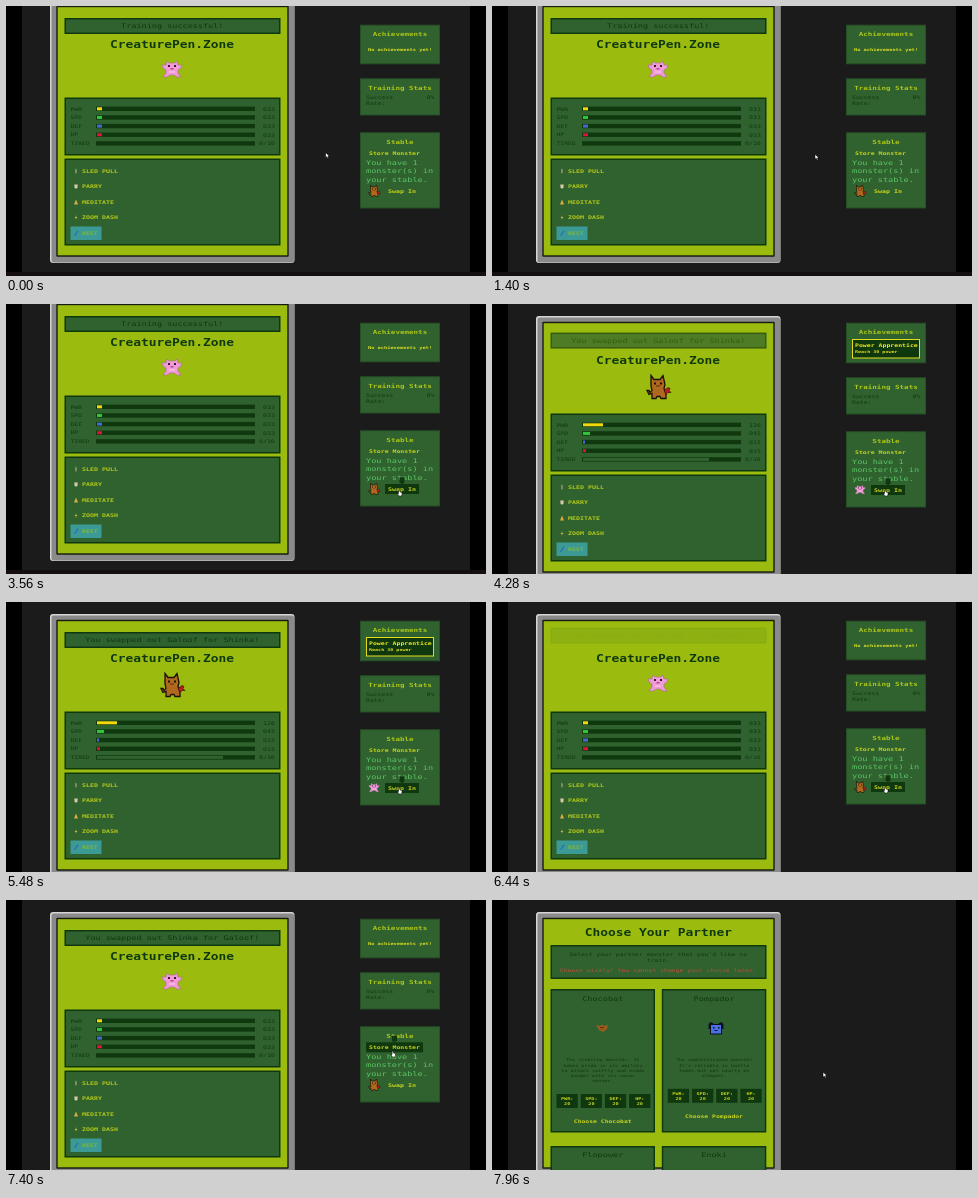
Write an HTML page that moves like this. It is 480 px wide and 270 px high and loops after 8 s.

```html
<!DOCTYPE html>
<html lang="en">
<head>
<meta charset="utf-8">
<title>Monster stable</title>
<style>
  html, body { margin: 0; width: 100%; height: 100%; overflow: hidden; background: #000; }
  svg { display: block; width: 100vw; height: 100vh; }
  text { font-family: "DejaVu Sans Mono", "Liberation Mono", monospace; white-space: pre; }
</style>
</head>
<body>
<svg id="stage" viewBox="0 0 480 270"></svg>
<script>
const LOOP = 8000, SWAP = 3880, SWAP_BACK = 6376, STORE = 7480, FADE = 560;
const INK = '#0f380f', LEAF = '#306230', LIME = '#9bbc0f', GOLD = '#c9d51c', MINT = '#5cc465';
const WIDE = 1.34; // the face is a wide pixel mono

const rect = (x, y, w, h, fill, more = '') =>
  `<rect x="${x}" y="${y}" width="${w}" height="${h}" fill="${fill}" ${more}/>`;
const poly = (points, fill, more = '') => `<polygon points="${points}" fill="${fill}" ${more}/>`;
const group = (id, body, more = '') => `<g id="${id}" ${more}>${body}</g>`;

// x: left edge, y: middle of the capitals, step: advance per character
function label(x, y, str, step, fill, weight = fill === INK ? 400 : 700) {
  const size = step / (0.602 * WIDE);
  return `<text transform="translate(${x} ${(y + size * 0.365).toFixed(2)}) scale(${WIDE} 1)"
    font-size="${size.toFixed(2)}" font-weight="${weight}" fill="${fill}">${str}</text>`;
}
const centered = (cx, y, str, step, fill, weight) =>
  label(cx - str.length * step / 2, y, str, step, fill, weight);

const box = (x, y, w, h, edge = 1.5, stroke = INK) =>
  rect(x + edge / 2, y + edge / 2, w - edge, h - edge, LEAF, `stroke="${stroke}" stroke-width="${edge}"`);
const card = (y, h, title) =>
  box(354, y, 80, h, 1, '#254f25') + centered(394, y + 9.3, title, 4.55, '#abc51a');

const star = poly('-5,-8 -3,-6 3,-6 5,-8 6,-4 10,-4 9,-1 6,1 6,4 9,8 5,8 2,6 -2,6 -5,8 -9,8 -6,4 -6,1 -9,-1 -10,-4 -6,-4',
    '#f09ad8', 'stroke="#a8689a" stroke-width=".6"') +
  rect(-4, -4, 2, 2, '#3c1836') + rect(2, -4, 2, 2, '#3c1836') +
  rect(-1.5, -1, 3, 1.5, '#b04890') + rect(-3, 2, 6, 2, '#f7b4e0');
const cat = poly('-8,-12 -5,-8 1,-8 4,-12 6,-3 5,1 7,6 7,11 2,11 1,9 -2,9 -3,11 -7,11 -7,6 -10,7 -12,3 -10,3 -9,5 -7,3 -8,-2',
    '#b0681f', 'stroke="#1c1008" stroke-width="1.3"') +
  rect(-5, -5, 2, 2, '#1c1008') + rect(1, -5, 2, 2, '#1c1008') + rect(-3, -2, 4, 1, '#5a2c10') +
  poly('5,3 9,0 11,1 10,3 12,5 9,5 7,7', '#b81c1c', 'stroke="#1c1008" stroke-width=".6"');

const frame = group('panel',
  rect(44, 12, 244.5, 263, '#d6d6d6', 'rx="3"') +
  rect(45.5, 13.5, 242.5, 261, '#8a8a8a', 'rx="2"') +
  rect(50.3, 17.8, 232.4, 250.9, '#161a10', 'rx="1"') +
  rect(51.7, 19.2, 229.6, 248.1, LIME) +
  group('game', '') + group('choose', ''));

function gameView() {
  const stats = ['PWR', 'SPD', 'DEF', 'HP', 'TIRED'];
  const tints = ['#f4d80c', '#2fc63a', '#4468dc', '#dc143c', LEAF];
  const moves = [
    ['SLED PULL', '-.8,-2.5 .8,-1 .4,2.5 -.6,2.5', '#a4a070'],
    ['PARRY', '-1.7,-2 1.7,-2 1.5,.8 0,2.4 -1.5,.8', '#d8c8a8'],
    ['MEDITATE', '0,-2.6 2,2.4 -2,2.4', '#dcaa40'],
    ['ZOOM DASH', '.6,-2.4 -1.4,.5 0,.5 -.6,2.4 1.4,-.5 0,-.5', '#d0b840']];
  const rows = stats.map((name, i) => {
    const y = 120.8 + i * 8.65;
    return label(64.5, y, name, 3.85, INK) + rect(90, y - 2.2, 159, 4.4, INK) +
      rect(91, y - 1.5, 5, 3, tints[i], 'class="fill"') +
      `<g class="was">${i < 4 ? label(257, y, '033', 3.95, INK) : label(253, y, '0/10', 3.95, INK)}</g>` +
      `<g class="now">${i < 4 ? label(257, y, ['126', '045', '015', '015'][i], 3.95, INK) : label(253, y, '8/10', 3.95, INK)}</g>`;
  }).join('');
  const list = moves.map(([name, shape, tint], i) => {
    const y = 183 + i * 15.5;
    return poly(shape, tint, `transform="translate(70 ${y})"`) + label(76, y, name, 4, '#b4cb18');
  }).join('');
  return group('note', box(58.5, 30, 216, 16) + label(0, 37.5, '', 5.12, INK)) +
    centered(166, 56, 'CreaturePen.Zone', 7.75, INK, 700) +
    group('starBig', star, 'transform="translate(166 81)"') +
    group('catBig', cat, 'transform="translate(167 83.5)"') +
    box(58.5, 109.5, 216, 58) + rows +
    box(58.5, 170.5, 216, 87) + list +
    rect(64.5, 238.5, 31, 13.5, '#3b9a96') + poly('68,247.5 71.5,242.5 72.5,243.3 69,248', '#2f68b8') +
    label(76, 245, 'REST', 3.9, '#7fb83c');
}

function partner(x, shift, name, lines) {
  const mid = x + 52.3;
  const stats = ['PWR:', 'SPD:', 'DEF:', 'HP:'].map((s, i) =>
    rect(x + 6 + i * 24.2, 194 - shift, 21.3, 14, INK) +
    centered(x + 16.7 + i * 24.2, 198.6 - shift, s, 3.1, GOLD) +
    centered(x + 16.7 + i * 24.2, 204 - shift, '20', 3.1, GOLD)).join('');
  return box(x, 89, 104.5, 143.5) + centered(mid, 99, name, 5.15, INK) +
    lines.map((s, i) => centered(mid, 160 + i * 5.2, s, 3.07, INK)).join('') +
    stats + centered(mid, 221.5 - shift, 'Choose ' + name, 3.87, GOLD);
}

function chooseView() {
  const bat = poly('104,125 108,126 110,124.5 112,126 116,125 115,129 111,132 107,130', '#9a5c1c') +
    rect(108, 127, 4, 1.2, '#5c3210');
  const pom = poly('216.5,124 219,122 222,124 226,124 229,122 231.5,124 231.5,129 230,129 230,134.5 218,134.5 218,129 216.5,129', '#0c1020') +
    rect(219, 125, 10, 8.5, '#4a70e6') + rect(221, 127, 1.5, 1.5, '#0c1020') +
    rect(226, 127, 1.5, 1.5, '#0c1020') + rect(222.5, 130, 3, 1, '#0c1020');
  return centered(166.3, 32, 'Choose Your Partner', 7.75, INK, 700) +
    box(58.5, 45, 216, 34) +
    centered(166.5, 54, "Select your partner monster that you'd like to", 3.87, INK) +
    centered(166.5, 60, 'train.', 3.87, INK) +
    centered(166.5, 70, 'Choose wisely! You cannot change your choice later.', 3.87, '#b8503c', 400) +
    partner(58.5, 0, 'Chocobat', ['The stealthy monster. It', 'takes pride in its ability',
      'to attack swiftly and evade', 'danger with its sonar', 'senses.']) + bat +
    partner(169.8, 5.2, 'Pompador', ['The sophisticated monster', "It's reliable in battle", 'fumes but not nearly as', 'elegant.']) + pom +
    box(58.5, 246, 104.5, 143) + centered(110.8, 255, 'Flopower', 5.15, INK) +
    box(169.8, 246, 104.5, 143) + centered(222, 255, 'Enoki', 5.15, INK);
}

const hover = (id, x, y, w) => group(id, rect(x, y, w, 10, INK) + rect(x + w / 2 - 2.5, y - 6.5, 5, 5.5, INK) +
  rect(x + w / 2 - 1, y - 1, 2, 1, INK));

function sideView() {
  const reward = rect(360.5, 35.5, 67, 18.5, INK, 'stroke="#e2dc20" stroke-width="1"') +
    label(363, 41, 'Power Apprentice', 3.93, '#f4ec20') + label(363, 48, 'Reach 30 power', 3.05, '#e2dc20');
  return group('noAward', card(18.7, 39.6, 'Achievements') + centered(394, 43.5, 'No achievements yet!', 3.2, '#dce01e')) +
    group('award', card(18.7, 40.6, 'Achievements') + reward) +
    group('lower',
      card(72.3, 37.2, 'Training Stats') + label(360, 91, 'Success', 3.9, INK) + label(360, 97.3, 'Rate:', 3.9, INK) +
      label(420.5, 91, '0%', 3.9, INK) +
      card(126.3, 76.2, 'Stable') +
      ['You have 1', 'monster(s) in', 'your stable.'].map((s, i) => label(360, 156.5 + i * 8.5, s, 5.17, MINT, 400)).join('') +
      hover('storeHover', 360, 142.3, 57) + hover('swapHover', 379, 180, 34) +
      label(363, 147.6, 'Store Monster', 3.92, GOLD) + label(382, 185.2, 'Swap In', 4, GOLD) +
      group('catSmall', cat, 'transform="translate(368.5 185) scale(.5)"') +
      group('starSmall', star, 'transform="translate(368 184.5) scale(.52)"'));
}

const stage = document.getElementById('stage');
stage.innerHTML = rect(0, 0, 480, 270, '#000') + rect(16, 0, 448, 270, '#1b1b1b') +
  group('footer', rect(0, 266, 480, 4, '#140d11')) + frame + group('side', sideView()) +
  group('cursor', poly('0,0 0,5.2 1.3,4.2 2.3,6 3.2,5.5 2.4,3.8 3.9,3.6', '#fff', 'id="arrow" stroke="#000" stroke-width=".6"') +
    poly('-.8,0 .2,0 .5,2 2.6,2.6 2.4,5 1.8,6 -.6,6 -2.2,3.4 -1,3.6', '#fff', 'id="hand" stroke="#000" stroke-width=".5"'));

const $ = id => document.getElementById(id);
$('game').innerHTML = gameView();
$('choose').innerHTML = chooseView();
const fills = [...stage.querySelectorAll('.fill')];
const was = [...stage.querySelectorAll('.was')], now = [...stage.querySelectorAll('.now')];
const noteText = $('note').querySelector('text');

const show = (el, on) => el.setAttribute('display', on ? 'inline' : 'none');
const clamp = v => Math.max(0, Math.min(1, v));
const ease = v => v * v * (3 - 2 * v);

// time, x, y of the pointer tip
const track = [[0, 319.5, 146.5], [520, 319.5, 146.5], [600, 320.5, 147], [1280, 320.5, 147], [2360, 391, 179.3],
  [2920, 393, 185], [3560, 393.5, 186], [5720, 393.5, 186], [6440, 393.5, 185],
  [6560, 393.5, 185], [7360, 387, 151], [7560, 387, 151], [7960, 331, 172]];

function pointer(t) {
  const i = track.findIndex(k => k[0] > t);
  if (i < 0) return track[track.length - 1].slice(1);
  const [a, b] = [track[i - 1], track[i]];
  const p = ease((t - a[0]) / (b[0] - a[0]));
  return [a[1] + (b[1] - a[1]) * p, a[2] + (b[2] - a[2]) * p];
}

function setNote(str, p) {
  if (noteText.textContent !== str) noteText.textContent = str;
  const size = 5.12 / (0.602 * WIDE);
  noteText.setAttribute('transform',
    `translate(${166.3 - str.length * 2.56} ${37.8 + size * 0.365}) scale(${WIDE} 1)`);
  $('note').setAttribute('opacity', p);
  $('note').setAttribute('transform', `translate(0 ${-5 * (1 - p)})`);
}

function render(t) {
  const swapped = t >= SWAP && t < SWAP_BACK, choosing = t >= STORE;
  const scroll = 18 * (1 - ease(clamp((t - SWAP) / 300)));
  $('panel').setAttribute('transform', `translate(0 ${-scroll})`);
  show($('footer'), t < SWAP);
  show($('game'), !choosing);
  show($('choose'), choosing);
  show($('side'), !choosing);

  if (t < SWAP) setNote('Training successful!', 1);
  else if (swapped) setNote('You swapped out Galoof for Shinka!', clamp((t - SWAP) / FADE));
  else setNote('You swapped out Shinka for Galoof!', clamp((t - SWAP_BACK) / FADE));

  for (const id of ['catBig', 'starSmall', 'award']) show($(id), swapped);
  for (const id of ['starBig', 'catSmall', 'noAward']) show($(id), !swapped);
  was.forEach(el => show(el, !swapped));
  now.forEach(el => show(el, swapped));
  const widths = swapped ? [20, 7, 2, 3, 126] : [5, 5, 5, 5, 0];
  fills.forEach((el, i) => el.setAttribute('width', widths[i]));
  $('lower').setAttribute('transform', `translate(0 ${swapped ? 1 : 0})`);

  const [x, y] = pointer(t);
  const onSwap = !choosing && x > 379 && x < 413 && y > 180 && y < 190;
  const onStore = !choosing && x > 360 && x < 417 && y > 142 && y < 152.3;
  show($('swapHover'), onSwap);
  show($('storeHover'), onStore);
  show($('hand'), onSwap || onStore);
  show($('arrow'), !onSwap && !onStore);
  $('cursor').setAttribute('transform', `translate(${x} ${y})`);
}

const start = performance.now();
function tick() {
  render((performance.now() - start) % LOOP);
  requestAnimationFrame(tick);
}
tick();
</script>
</body>
</html>
```
